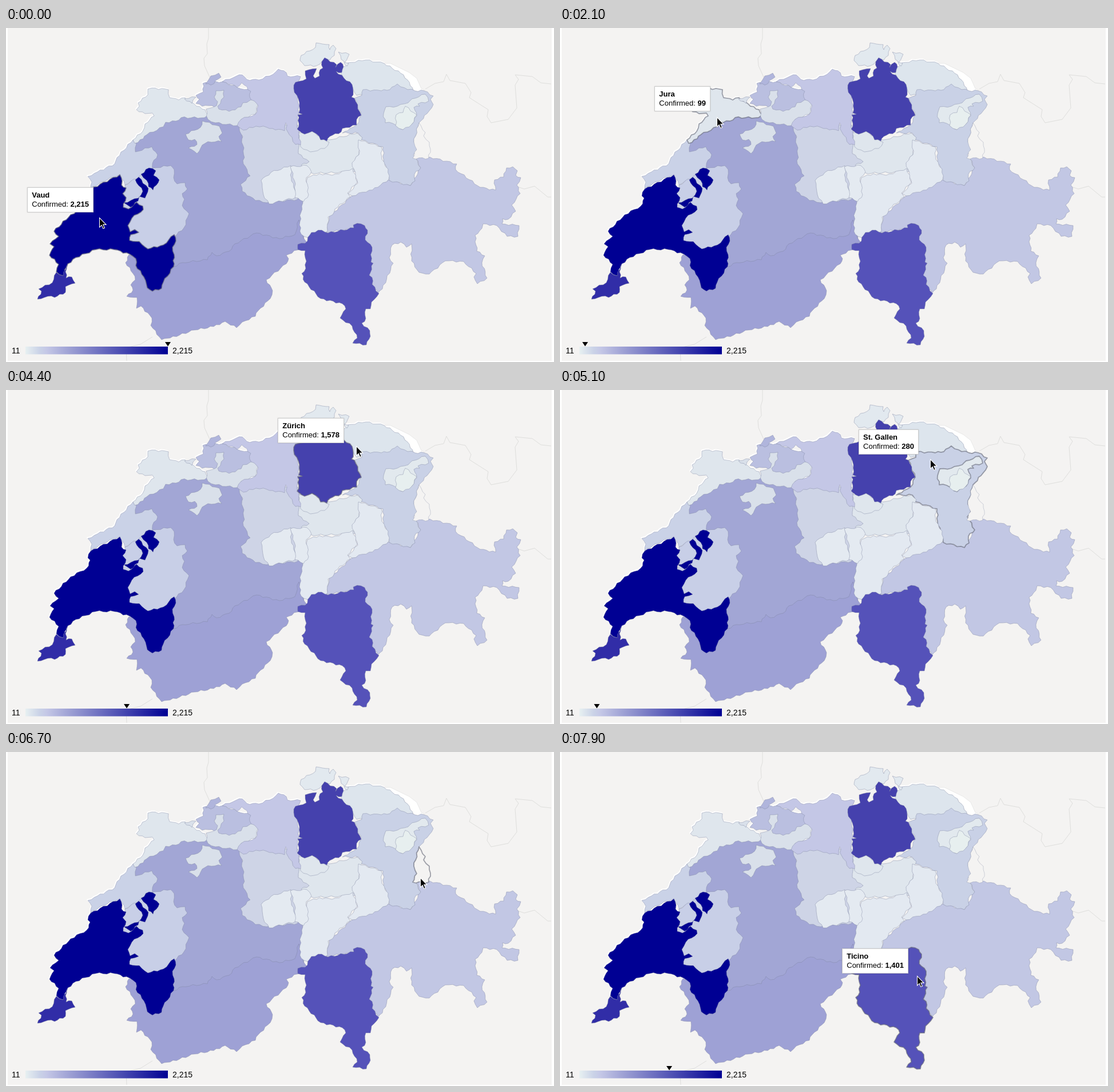
Animation, 958 px wide and 585 px high, one loop 8 s. Source, as an HTML page:

```html
<!DOCTYPE html>
<html lang="en">
<head>
<meta charset="utf-8">
<title>Canton map</title>
<style>
html, body { margin: 0; width: 100%; height: 100%; overflow: hidden; background: #fff; }
svg { position: absolute; left: 0; top: 0; }
text { font: 14px "Liberation Sans", Arial, sans-serif; }
#map path { stroke: #7d84a0; stroke-opacity: .42; stroke-linejoin: round; }
#map path.hover { stroke: #666a78; stroke-opacity: .6; stroke-width: 1.8; }
#tip {
  position: absolute; box-sizing: border-box; height: 44px; padding: 5px 7px;
  border: 1px solid #ccc; background: #fff; box-shadow: 0 0 2px rgba(0,0,0,.15);
  font: 13px/16px "Liberation Sans", Arial, sans-serif; white-space: nowrap;
}
#pointer { z-index: 1; }
</style>
</head>
<body>
<svg width="958" height="585">
  <defs>
    <linearGradient id="scale">
      <stop offset="0" stop-color="#e7f0f1"/><stop offset=".1" stop-color="#cad2e7"/>
      <stop offset=".15" stop-color="#c4c7e6"/><stop offset=".3" stop-color="#a0a3d5"/>
      <stop offset="1" stop-color="#000093"/>
    </linearGradient>
  </defs>
  <rect x="3" width="951" height="583" fill="#f4f3f2"/>
  <g fill="none" stroke="#dededc">
    <path d="M354 0V18L351 28 352 45 346 53 347 66 356 86"/>
    <path d="M733 107 750 97 765 94 770 81 776 92 803 97 813 113 810 122 843 143 841 155 848 166 878 160 893 140 890 100 896 90 890 82 920 85 935 96 953 98"/>
    <path d="M894 278 906 282 924 277 947 296H953"/>
    <path d="M256 541 235 554 210 560 211 583"/>
  </g>
  <g id="rim" fill="#fff" stroke="#fff" stroke-width="1.5" transform="translate(-1 -1.5)"/>
  <path fill="#fffffe" stroke="#ddd" stroke-width=".6" d="M655 62 672 62 705 78 718 88 726 106 732 109 715 112 695 83Z"/>
  <!-- Later cantons cover the rough edges of earlier ones. -->
  <g id="map">
    <path id="BE" data-name="Bern" data-count="624" fill="#a2a6d5" d="M225 198 280 150 354 150 410 165 430 280 520 300 520 375 290 420 260 300 225 240Z"/>
    <path id="LU" fill="#ced4e6" d="M404 170 510 170 530 234 510 300 456 306 436 302 413 286 410 274 427 259 415 238 416 210 412 200 414 190Z"/>
    <path id="VS" fill="#9ea1d5" d="M293 418 308 411 352 406 360 393 368 399 390 391 400 378 438 359 478 369 505 362 512 336 518 361 530 385 509 389 490 398 494 404 490 413 455 441 466 460 462 474 441 495 436 505 413 515 403 525 383 514 363 523 330 529 287 543 272 546 253 521 255 508 236 487 228 491 229 472 211 470 222 459 218 450 226 441 222 430 209 411 215 397 245 400Z"/>
    <path id="BL" data-name="Basel-Landschaft" data-count="341" fill="#babfe0" d="M344 97 378 94 404 104 430 110 435 130 400 150 372 145 360 136 343 137 332 132 338 125 332 118 345 112Z"/>
    <path id="BS" fill="#b0b5dc" d="M354 91 358 84 372 79 376 86 358 100 349 98Z"/>
    <path id="NE" data-name="Neuchâtel" data-count="261" fill="#cad2e7" d="M143 260 160 252 190 238 194 227 222 196 228 203 226 217 255 208 265 222 256 237 258 250 208 275 199 257 166 270 148 282 150 270Z"/>
    <path id="JU" data-name="Jura" data-count="99" fill="#dfe6ed" d="M228 143 233 137 231 131 248 117 248 107 255 105 284 108 286 122 302 126 313 122 333 137 348 143 354 152 347 157 306 157 297 163 279 165 275 173 246 187 240 194 225 202 222 196 239 181 243 168 259 154 256 149 243 150Z"/>
    <path id="SO" data-name="Solothurn" data-count="144" fill="#d9e0ea" d="M353 160 350 142 368 136 370 129 364 121 367 110 381 109 381 121 370 137 372 142 390 146 411 138 414 131 434 125 441 134 436 151 411 160 404 171 366 166ZM343 163 373 172 378 184 372 190 377 199 353 199 343 205 334 220 319 210 334 204 330 195 319 196 314 186 340 174ZM312 124 332 121 325 132Z"/>
    <path id="FR" fill="#c8cfe7" d="M258 245 288 241 294 248 293 262 299 273 313 271 317 282 308 290 312 300 308 311 320 325 311 350 294 366 260 395 215 373 204 290 208 275Z"/>
    <path id="VD" data-name="Vaud" data-count="2215" fill="#000093" d="M76 398 84 383 77 378 92 365 84 356 113 327 141 312 147 298 143 294 148 282 199 257 203 268 202 275 210 280 204 290 210 297 205 314 214 317 228 305 239 312 240 318 220 333 213 346 217 357 225 353 232 358 218 362 216 372 233 374 248 387 275 380 294 362 297 373 291 384 294 397 293 418 275 445 272 456 256 461 247 455 241 436 227 416 227 404 216 396 189 388 157 388 122 402 108 413 100 434 88 427 92 414Z"/>
    <path fill="#000093" d="M236 256 250 245 262 250 258 258 268 266 257 284 249 278 246 267ZM226 266 232 261 249 281 243 298 233 295 231 303 218 314 206 306 231 298 239 286Z"/>
    <path id="GE" fill="#312da7" d="M55 475 62 461 57 457 81 446 88 428 100 434 106 416 105 438 115 436 121 447 104 453 104 463 85 472 73 470Z"/>
    <path id="GR" data-name="Graubünden" data-count="373" fill="#c2c7e4" d="M560 358 565 330 605 294 642 277 669 266 707 276 725 245 716 228 741 226 788 238 786 248 829 279 856 284 854 266 870 261 875 245 886 243 894 250 891 258 900 262 893 275 899 290 884 310 891 321 878 335 868 334 867 343 897 346 895 365 876 365 858 346 834 343 832 351 820 363 823 391 837 399 832 411 841 438 824 448 818 436 822 430 800 409 768 408 740 431 722 428 709 408 709 378 700 384 690 375 675 380 670 402 677 412 658 457 650 465 630 430 620 350Z"/>
    <path id="TG" data-name="Thurgau" data-count="106" fill="#dde5ed" d="M577 64 592 68 597 61 629 56 661 62 695 82 711 105 711 112 613 118 588 84Z"/>
    <path id="SG" data-name="St. Gallen" data-count="280" fill="#c9d1e6" d="M609 123 622 118 624 108 656 110 671 108 684 98 690 103 715 110 731 110 747 119 742 125 747 134 736 150 722 166 713 200 718 213 712 222 725 245 714 256 715 268 707 276 670 267 660 230 659 208 622 196 616 184 588 184 601 176 613 170 621 153Z"/>
    <path id="AR" fill="#e2e9ee" d="M664 138 684 137 703 131 710 124 733 116 739 128 720 133 723 137 713 139 718 154 710 168 694 178 676 167 663 166 660 150Z"/>
    <path id="AI" data-name="Appenzell Innerrhoden" data-count="11" fill="#e7efef" d="M682 152 694 148 698 137 718 152 709 169 694 178 681 171Z"/>
    <path id="SZ" fill="#dfe6ed" d="M511 200 565 196 614 184 623 192 617 222 605 237 611 252 520 255 516 240 530 234 511 220Z"/>
    <path id="ZG" fill="#dfe6ed" d="M511 184 535 181 565 200 557 211 532 217 515 208Z"/>
    <path id="GL" fill="#e3e9f1" d="M616 196 656 208 657 230 668 247 669 265 650 279 635 284 605 294 598 290 615 272 605 236 617 222Z"/>
    <path id="UR" fill="#e3e9f1" d="M525 283 527 262 548 255 570 258 606 246 614 270 597 289 602 296 575 317 571 327 563 331 562 356 527 367 516 361 513 345 517 312Z"/>
    <path id="OW" fill="#e4eaf1" d="M448 279 446 267 463 253 498 241 499 268 508 289 506 297 460 308 450 292Z"/>
    <path id="NW" fill="#e4eaf1" d="M497 243 526 241 534 252 525 262 529 292 520 304 505 297 506 273Z"/>
    <path id="AG" data-name="Aargau" data-count="349" fill="#c4c7e6" d="M378 94 403 84 413 82 421 90 442 91 467 81 476 72 490 78 492 84 515 85 503 106 510 117 512 149 509 168 515 205 506 204 492 181 489 166 487 180 466 176 456 174 437 172 415 179 404 171 411 160 436 151 441 136 426 121 428 111 412 96 404 104 396 99Z"/>
    <path id="SH" fill="#e2e9ef" d="M514 57 516 48 541 34 542 26 553 28 565 29 566 38 572 30 577 36 574 48 566 56 558 54 543 66 522 66ZM581 42 600 46 592 60 599 62 596 67 586 55Z"/>
    <path id="ZH" data-name="Zürich" data-count="1578" fill="#4541ad" d="M503 106 506 95 525 89 523 75 543 71 537 84 540 88 548 84 549 73 554 70 552 59 557 52 578 64 576 69 585 60 590 68 587 78 577 76 605 99 607 117 604 121 609 123 621 153 613 160 613 170 588 176 586 182 566 190 561 198 550 196 542 185 535 181 522 186 509 177 512 167 510 152 518 151 512 149 513 131Z"/>
    <path id="TI" data-name="Ticino" data-count="1401" fill="#5552b9" d="M510 379 523 377 534 358 552 354 563 359 608 350 607 345 614 342 627 346 632 354 628 371 640 384 638 410 642 412 635 433 640 437 640 449 652 465 639 480 637 492 629 492 627 514 622 517 636 530 637 540 630 555 606 552 614 543 605 522 584 508 594 492 588 483 550 474 522 445 517 430 524 421 523 390 510 388Z"/>
    <path id="LI" fill="#f4f3f2" stroke-width=".8" d="M722 166 733 183 730 189 740 200 742 212 739 228 711 228 718 213 713 200Z"/>
  </g>
  <rect x="34" y="558" width="249" height="13.5" fill="url(#scale)"/>
  <text x="10" y="570">11</text>
  <text x="291" y="570">2,215</text>
  <path id="marker" d="M-5 550H5L0 557.5Z"/>
</svg>
<div id="tip"><b id="title"></b><br>Confirmed: <b id="count"></b></div>
<svg id="pointer" width="958" height="585">
  <path id="cursor" stroke="#fff" stroke-width="1.1" d="M.5 .5V17L4.2 13.4 6.8 19.4 9.4 18.3 6.8 12.4H12Z"/>
</svg>
<script>
const $ = id => document.getElementById(id);

// Seeded wobble that gives the long edges of a ring the look of a natural border.
function roughen(ring) {
  const points = ring.match(/\d+ \d+/g).map(pair => pair.split(' ').map(Number));
  const result = points.flatMap(([x, y], i) => {
    const [x2, y2] = points[(i + 1) % points.length];
    const length = Math.hypot(x2 - x, y2 - y), steps = Math.max(1, Math.round(length / 6));
    return Array.from({ length: steps }, (_, k) => {
      const u = k / steps, wobble = k ? 1.5 * Math.sin((x * 13 + y * 7 + k * 31) * 5) / length : 0;
      return [x + (x2 - x) * u - (y2 - y) * wobble, y + (y2 - y) * u + (x2 - x) * wobble];
    });
  });
  return `M${result.join(' ')}Z`;
}

for (const path of document.querySelectorAll('#map path'))
  path.setAttribute('d', path.getAttribute('d').replace(/M[^Z]+Z/g, roughen));
for (const id of ['JU', 'NE', 'VD', 'BL', 'AG', 'TG']) {
  const edge = $(id).cloneNode();
  edge.removeAttribute('id');
  edge.removeAttribute('fill');
  $('rim').append(edge);
}

// [time, x, y] of the pointer, and of the tooltip's lower right corner relative to it
const pointerKeys = [
  [0, 163, 332], [500, 163, 332], [1000, 205, 272], [1400, 240, 221], [2100, 274, 156],
  [2300, 285, 147], [2700, 345, 137], [3300, 438, 115], [3500, 498, 112], [3600, 498, 112],
  [3800, 540, 104], [3900, 540, 104], [4400, 612, 98], [4500, 622, 99], [4600, 622, 99],
  [4700, 626, 91], [4800, 626, 91], [5600, 681, 170], [5800, 693, 161], [5900, 693, 161],
  [6100, 698, 149], [6300, 711, 175], [6700, 724, 220], [6900, 749, 232], [7200, 735, 270],
  [7700, 690, 346], [7900, 624, 392]
];
const offsetKeys = [
  [0, -10, -9], [2100, -11, -10], [3300, -6, -11], [4400, -21, -5], [5600, -19, -10], [7900, -15, -4]
];
const hovers = [
  [0, 'VD'], [1000, 'NE'], [1400, 'BE'], [2000, 'JU'], [2800, 'BL'], [3100, 'SO'], [3300, 'AG'],
  [3700, 'ZH'], [4500, 'TG'], [5000, 'SG'], [5700, 'AI'], [6300, 'SG'], [6500, 'LI'], [6800, 'GR'], [7800, 'TI']
];

function at(keys, t) {
  const next = keys.findIndex(key => key[0] > t);
  if (next < 0) return keys[keys.length - 1].slice(1);
  const a = keys[next - 1], b = keys[next], u = (t - a[0]) / (b[0] - a[0]);
  return [1, 2].map(i => Math.round(a[i] + (b[i] - a[i]) * u));
}

function draw(now) {
  const t = Math.floor(now % 8000 / 100) * 100;
  const [x, y] = at(pointerKeys, t), [dx, dy] = at(offsetKeys, t);
  const active = hovers.filter(hover => hover[0] <= t).pop()[1];
  const { name = '', count = 0 } = $(active).dataset;

  for (const path of $('map').children) path.classList.toggle('hover', path.id === active);
  // The inner border of the enclosing canton is highlighted too.
  if (active === 'SG') $('AR').classList.add('hover');
  $('cursor').setAttribute('transform', `translate(${x} ${y})`);
  $('marker').setAttribute('transform', `translate(${34 + (count - 11) / 2204 * 249})`);
  $('marker').style.display = $('tip').style.display = name ? '' : 'none';
  $('title').textContent = name;
  $('count').textContent = Number(count).toLocaleString('en-US');
  $('tip').style.right = `calc(100% - ${x + dx}px)`;
  $('tip').style.bottom = `calc(100% - ${y + dy}px)`;
  requestAnimationFrame(draw);
}
requestAnimationFrame(draw);
</script>
</body>
</html>
```
